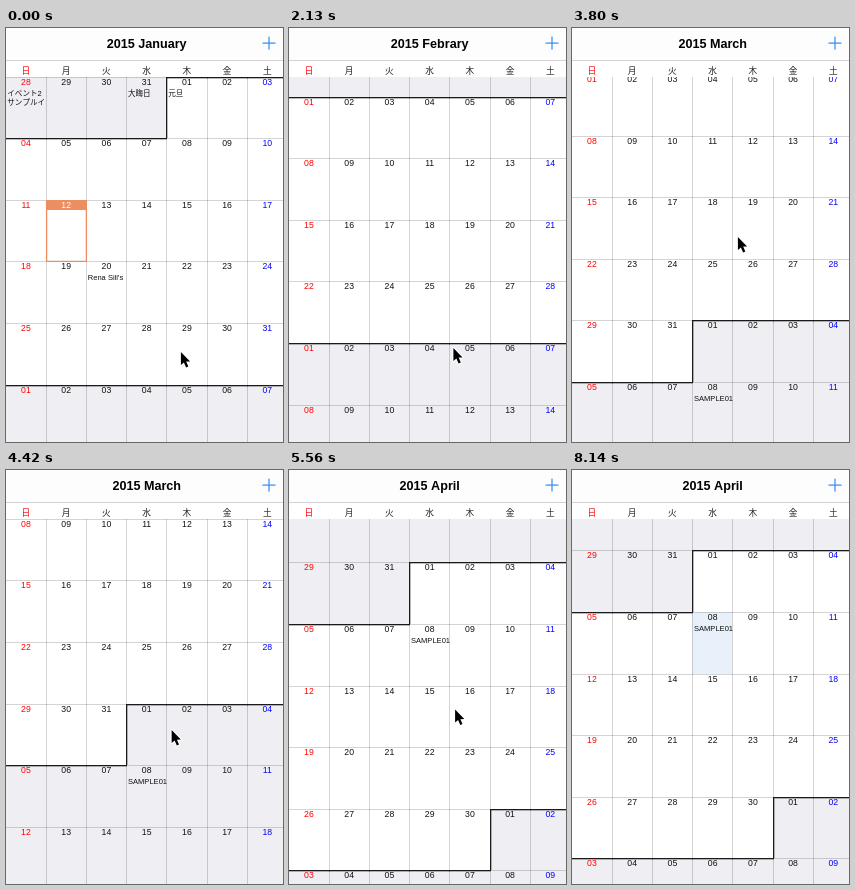
These frames come from a looping animation (277 by 414 pixels, 9790 ms). An HTML page with a canvas:

```html
<!DOCTYPE html>
<html lang="ja">
<head>
<meta charset="utf-8">
<title>Calendar</title>
<style>
  html, body { margin: 0; width: 100%; height: 100%; overflow: hidden; background: #fff; }
  canvas { display: block; width: 277px; height: 414px; }
</style>
</head>
<body>
<canvas></canvas>
<script>
const W = 277, H = 414, LOOP = 9790, STEP = 88.2;
const COL = 40.24, ROW = 61.6, GRID_TOP = 48.5;
const MONTHS = ['January', 'Febrary', 'March', 'April', 'May'];
const SANS = '"Liberation Sans", "Noto Sans CJK JP", "Noto Sans CJK", sans-serif';
const EVENTS = {
  '12/28': ['イベント2', 'サンプルイ'],
  '12/31': ['大晦日'],
  '1/1': ['元旦'],
  '1/20': ["Rena Sill's"],
  '4/8': ['SAMPLE01']
};

// Each drag pulls the grid up; times are screen steps, x and y where the pointer grabs.
const DRAGS = [
  { start: 8, end: 13, x: 174.5, y: 323, pull: 144 },
  { start: 19, end: 23, x: 168, y: 320, pull: 144 },
  { start: 24, end: 29, x: 164, y: 319, pull: 127 },
  { start: 35, end: 43, x: 157.5, y: 334, pull: 142 },
  { start: 48, end: 55, x: 165, y: 310, pull: 120 },
  { start: 56, end: 67, x: 167, y: 304.5, pull: 92 }
];
const GLIDE = 16;
const RELEASE_X = 165.5;
const CLICK_STEP = 84, POINTER_GONE = 92;

const canvas = document.querySelector('canvas');
const ctx = canvas.getContext('2d');
const ratio = window.devicePixelRatio || 1;
canvas.width = W * ratio;
canvas.height = H * ratio;

const progress = (step, start, end) => Math.min(1, Math.max(0, (step - start) / (end - start)));
const easeOut = k => 1 - (1 - k) ** 2;
const mix = (a, b, k) => ({ x: a.x + (b.x - a.x) * k, y: a.y + (b.y - a.y) * k });

function sceneAt(step) {
  let scroll = 0, pointer = DRAGS[0], lastEnd = 0;
  for (const drag of DRAGS) {
    const k = easeOut(progress(step, drag.start, drag.end));
    const release = { x: RELEASE_X, y: drag.y - drag.pull + GLIDE };
    pointer = mix(pointer, drag, progress(step, Math.max(lastEnd, drag.start - 3), drag.start));
    pointer = mix(pointer, release, k);
    scroll += drag.pull * k;
    lastEnd = drag.end;
  }
  pointer = mix(pointer, { x: 142, y: 190 }, progress(step, 72, 77));
  pointer = mix(pointer, { x: 238, y: 432 }, progress(step, 86, POINTER_GONE));
  return { scroll, pointer };
}

function rect(x, y, w, h, color) {
  ctx.fillStyle = color;
  ctx.fillRect(x, y, w, h);
}

function text(string, x, y, size, color, align = 'center', weight = '') {
  ctx.font = `${weight} ${size}px ${SANS}`;
  ctx.textAlign = align;
  ctx.fillStyle = color;
  ctx.fillText(string, x, y);
}

const colX = col => Math.floor(col * COL);
const colMid = col => (col + 0.5) * COL - 0.2;
const dateAt = (week, col) => new Date(Date.UTC(2014, 11, 28 + week * 7 + col));
const monthAt = (week, col) => dateAt(week, col).getUTCMonth();
const dayColor = col => col === 0 ? '#f00' : col === 6 ? '#00f' : '#111';

function keyAt(week, col) {
  const date = dateAt(week, col);
  return `${date.getUTCMonth() + 1}/${date.getUTCDate()}`;
}

function drawCell(week, col, y, y2, shownMonth, selected) {
  const x = colX(col), w = colX(col + 1) - x, h = y2 - y;
  const line = 'rgba(0, 0, 0, 0.17)';
  rect(x, y, w, h, monthAt(week, col) === shownMonth ? '#fff' : '#efeef3');
  if (selected && keyAt(week, col) === '4/8') rect(x, y, w, h, '#e8f1f9');
  rect(x, y, w, 1, line);
  if (col) rect(x, y, 1, h, line);
}

function drawContents(week, col, y, y2) {
  const x = colX(col), w = colX(col + 1) - x;
  const month = monthAt(week, col), key = keyAt(week, col);
  const today = key === '1/12';
  const day = key.split('/')[1].padStart(2, '0');

  if (month !== monthAt(week - 1, col)) rect(x, y, w + 1, 1.3, '#1a1a1a');
  if (col && month !== monthAt(week, col - 1)) rect(x, y, 1.3, y2 - y, '#1a1a1a');
  if (today) {
    rect(x, y, w + 1, 10, '#ec8e62');
    ctx.strokeStyle = '#ec8e62';
    ctx.lineWidth = 1.3;
    ctx.strokeRect(x + 0.6, y + 0.6, w - 0.2, y2 - y - 0.2);
  }
  text(day, colMid(col), y + 8.1, 8.7, today ? '#fff' : dayColor(col));
  (EVENTS[key] || []).forEach((line, i) =>
    text(line, col * COL + 1.3, y + 19.2 + i * 8.7, 7.55, '#111', 'left'));
}

function drawGrid(scroll, shownMonth, selected) {
  const rowY = week => Math.round(GRID_TOP + week * ROW - scroll);
  const first = Math.floor(scroll / ROW);
  ctx.save();
  ctx.beginPath();
  ctx.rect(0, 49, W, H);
  ctx.clip();
  for (const pass of [drawCell, drawContents])
    for (let week = first; week < first + 8; week++)
      for (let col = 0; col < 7; col++)
        pass(week, col, rowY(week), rowY(week + 1), shownMonth, selected);
  ctx.restore();
}

function drawHeader(month) {
  rect(0, 0, W, 32, '#fdfdfd');
  rect(0, 32, W, 1, '#d3d3d5');
  text('2015 ' + MONTHS[month], 140.7, 20.4, 12.6, '#000', 'center', 'bold');
  rect(256.5, 14.5, 13, 1.2, '#2f8cfa');
  rect(262.4, 8.6, 1.2, 13, '#2f8cfa');
  [...'日月火水木金土'].forEach((name, col) =>
    text(name, colMid(col), 46, 8.7, col ? '#222' : '#f00'));
}

function drawPointer({ x, y }) {
  const outline = [[0, 0], [0, 13], [3, 10.4], [5.2, 15.4], [7.4, 14.4], [5.3, 9.6], [9.2, 9.4]];
  ctx.beginPath();
  outline.forEach(([dx, dy]) => ctx.lineTo(x + dx + 0.4, y + dy + 1));
  ctx.closePath();
  ctx.lineJoin = 'round';
  ctx.lineWidth = 2.2;
  ctx.strokeStyle = '#fff';
  ctx.stroke();
  ctx.fillStyle = '#000';
  ctx.fill();
}

function draw(time) {
  const step = Math.floor((time % LOOP) / STEP);
  const { scroll, pointer } = sceneAt(step);
  // The title follows the month reaching the third visible row.
  const month = monthAt(Math.floor((scroll + 2 * ROW - 0.1) / ROW), 6);

  ctx.setTransform(ratio, 0, 0, ratio, 0, 0);
  rect(0, 0, W, H, '#fff');
  drawGrid(scroll, month, step >= CLICK_STEP);
  drawHeader(month);
  if (step < POINTER_GONE) drawPointer(pointer);
}

const start = performance.now();
function tick() {
  draw(performance.now() - start);
  requestAnimationFrame(tick);
}
tick();
</script>
</body>
</html>
```
